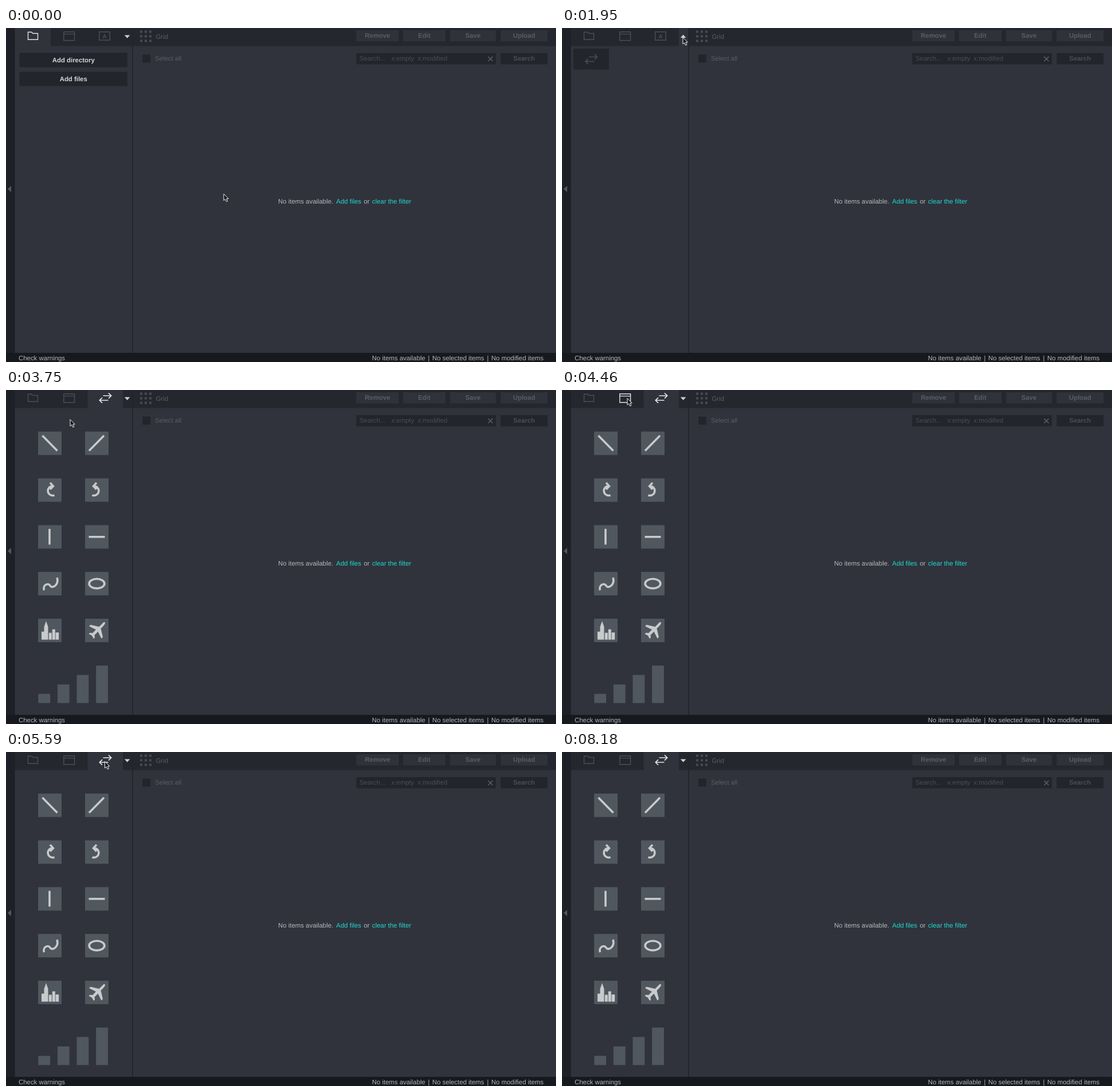
Write an HTML page that moves like this. It is 960x584 px and loops after 9010 ms.

```html
<!DOCTYPE html>
<html lang="en">
<head>
<meta charset="utf-8">
<title>Panel tabs</title>
<style>
  html, body { margin: 0; width: 100%; height: 100%; overflow: hidden; background: #30333b; }
  svg { display: block; width: 960px; height: 584px; }
  text {
    font: 11.4px "Liberation Sans", Arial, sans-serif; fill: #b4b7bc;
    white-space: pre; text-rendering: geometricPrecision;
  }
  .b { font-weight: bold; }
  .dim { fill: #595d65; }
  .faint { fill: #4a4e56; }
  .lit { fill: #d3d5d8; }
  .link { fill: #20d8d2; }
  .btn { fill: #22252b; }
  .raised { fill: #2f323a; }
  .field { fill: #2a2d34; }
  .tile { fill: #50575f; }
  .line { fill: none; stroke: #c8cacc; stroke-width: 3.6; }
  .solid { fill: #c8cacc; }
  .icon { fill: none; stroke: currentColor; stroke-width: 1.4; color: #4a4e57; }
  .icon text { fill: currentColor; stroke: none; font-size: 10px; font-weight: bold; }
  .icon.on { color: #e4e5e7; }
</style>
</head>
<body>
<svg id="stage" viewBox="0 0 960 584"></svg>
<script>
const LOOP = 9010;

const rect = (x, y, w, h, cls) => `<rect x="${x}" y="${y}" width="${w}" height="${h}" class="${cls}"/>`;
const box = (x, y, w, h, fill) => `<rect x="${x}" y="${y}" width="${w}" height="${h}" fill="${fill}"/>`;
const text = (x, y, s, cls = '', anchor = 'start') =>
  `<text x="${x}" y="${y}" class="${cls}" text-anchor="${anchor}">${s}</text>`;
const button = (x, y, w, h, s, cls, back = 'btn') =>
  rect(x, y, w, h, back) + text(x + w / 2, y + h / 2 + 3.7, s, 'b ' + cls, 'middle');
const group = (id, body, cls = '') => `<g id="${id}" class="${cls}">${body}</g>`;
const line = d => `<path class="line" d="${d}"/>`;
const solid = d => `<path class="solid" d="${d}"/>`;

const swap = '<path stroke-width="1.7" d="M-4-4H10M5.5-8.7l4.7 4.7-4.7 4.7M5 4H-10M-5.5-.7L-10.2 4l4.7 4.7"/>';
const at = (x, y, body) => `<g transform="translate(${x} ${y})">${body}</g>`;
const mirror = body => `<g transform="translate(41 0) scale(-1 1)">${body}</g>`;
const turn = line('M28.5 29.3A8.2 8.2 0 1 1 22 14.2H25M21 7.6l5.4 6-5.4 5.6');

const glyphs = [
  line('M7.5 7L33.5 33.5'),
  line('M33 7L7 33.5'),
  turn,
  mirror(turn),
  line('M20 6.5V34'),
  line('M6.5 20.5H34.5'),
  line('M10.5 32C7.5 24 17 17.5 21 24S37 22 33 10'),
  '<ellipse class="line" cx="20.5" cy="20.5" rx="13.4" ry="8.3"/>',
  solid('M6 36.5V22.5h4.5V14L14 4l3.5 10v22.5zM18.8 36.5v-12h5v12zM24.8 36.5v-18h5v18zM30.6 36.5V24h5.6v12.5z'),
  solid('M34.5 6c1.5 1.5-.5 4.5-3 7l-4 4 3.5 15-2.5 2.5-6-12-6 6 .5 4.5-2 2-3-5.5-5.5-3 2-2 4.5.5 6-6-12-6 2.5-2.5 15 3.5 4-4c2.5-2.5 4.5-5 6-4z')
];
const tiles = glyphs.map((g, i) =>
  at(56 + 82 * (i % 2), 72.7 + 81.8 * (i >> 1), rect(0, 0, 41, 41, 'tile') + g)).join('');
const bars = [16, 32.5, 49, 65.5].map((h, i) => rect(56.3 + 33.6 * i, 547.3 - h, 20.8, h, 'tile')).join('');

const dots = [...Array(9).keys()].map(i =>
  box(234 + 8 * (i % 3), 4.5 + 8 * (i / 3 | 0), 4, 4, '#474b54')).join('');

const field = (y, h, label) =>
  text(23.5, y - 7, label) + text(211.8, y - 7, '0', '', 'end') + rect(23.5, y, 188.5, h, 'field');

const chrome = [
  box(0, 0, 960, 584, '#30333b'),
  box(0, 0, 960, 31.5, '#24272d'),
  box(0, 0, 15.5, 568, '#1d2026'),
  box(220, 0, 1.8, 568, '#22252b'),
  box(0, 568, 960, 16, '#16191e'),
  '<path fill="#555962" d="M9 276v11l-6-5.5z"/>',
  dots,
  text(261.5, 19, 'Grid', 'dim'),
  button(611.5, 4, 74, 19.5, 'Remove', 'dim', 'raised'),
  button(693, 4, 74, 19.5, 'Edit', 'dim', 'raised'),
  button(775, 4, 80, 19.5, 'Save', 'dim', 'raised'),
  button(863.3, 4, 82, 19.5, 'Upload', 'dim', 'raised'),
  rect(238, 46.5, 14, 14, 'btn'),
  text(260, 57, 'Select all', 'dim'),
  rect(611.5, 44, 243.5, 19.5, 'btn'),
  text(617, 57, 'Search...', 'faint'),
  text(672.5, 57, 'x:empty', 'faint'),
  text(718.5, 57, 'x:modified', 'faint'),
  '<path stroke="#595d65" stroke-width="1.7" d="M841.5 50l8 8m0-8l-8 8"/>',
  button(863.3, 44, 82, 19.5, 'Search', 'faint'),
  text(475, 307, 'No items available.'),
  text(576.3, 307, 'Add files', 'link'),
  text(624.5, 307, 'or'),
  text(639, 307, 'clear the filter', 'link'),
  text(22, 581.3, 'Check warnings'),
  text(638.8, 581.3, 'No items available'),
  text(736.4, 580.5, '|'),
  text(744, 581.3, 'No selected items'),
  text(839.4, 580.5, '|'),
  text(847, 581.3, 'No modified items')
].join('');

const files = button(23.5, 43.5, 188.5, 25, 'Add directory', 'lit') +
  button(23.5, 76.5, 188.5, 25, 'Add files', 'lit');
const menu = rect(20, 36, 62, 36.5, 'btn') + group('swapItem', at(51.2, 54.5, swap), 'icon');
const meta = button(23.5, 43.5, 188.5, 25, 'Apply', 'faint') +
  field(101, 20.5, 'Title:') + field(149, 58, 'Description:') + field(234, 311, 'Keywords:') +
  text(145, 556.7, 'Copy') + text(176.6, 556, '|') + text(211.8, 556.7, 'Clear', '', 'end');

const tabs = [
  group('folder', '<path d="M38.5 7.2h6.2l2.2 2.3h8.6v10.8h-17z"/>', 'icon'),
  group('window', '<path d="M100.8 6.7h18.8v15h-18.8zM100.8 10.6h18.8"/>', 'icon'),
  group('letter', '<path d="M162.7 6.7h18.6v14.6h-18.6z"/>' + text(172, 17.6, 'A', '', 'middle'), 'icon'),
  group('swapTab', at(173.5, 14, swap), 'icon'),
  '<path id="toggle" fill="#d0d2d5"/>'
].join('');

const stage = document.getElementById('stage');
stage.innerHTML = chrome + '<rect id="active" height="32" fill="#30333b"/>' + tabs +
  group('files', files) + group('menu', menu) + group('transform', tiles + bars) + group('meta', meta) +
  '<path id="cursor" fill="#16181c" stroke="#f2f2f2" d="M0 0V11.6L2.7 9.2 4.7 13.6 6.8 12.7 4.9 8.4H8.3Z"/>';

const el = id => document.getElementById(id);
const show = (id, on) => el(id).setAttribute('visibility', on ? 'visible' : 'hidden');
const light = (id, on) => el(id).classList.toggle('on', on);

// start, panel, left edge and width of the open tab
const views = [
  [0, 'files', 15.5, 62.5],
  [1950, 'menu', 204, 16],
  [2920, 'transform', 142.5, 61.5],
  [4730, 'meta', 78.5, 62.5],
  [5590, 'transform', 142.5, 61.5]
];

// first step, last step, step count, points passed, easing
const out = u => 1 - (1 - u) ** 1.75;
const smooth = u => u * u * (3 - 2 * u);
const linear = u => u;
const moves = [
  [0, 0, 1, [[380, 290], [380, 290]], linear],
  [450, 450, 1, [[380, 290], [380, 286]], linear],
  [620, 1480, 10, [[380, 286], [211.5, 20.5]], out],
  [1570, 1570, 1, [[211.5, 20.5], [211, 16.5]], linear],
  [2130, 2560, 6, [[211, 16.5], [64.5, 45.5]], out],
  [3460, 4280, 10, [[64.5, 45.5], [82, 50], [112, 51.5], [160, 46], [181, 31], [123, 15.5]], linear],
  [4370, 4460, 2, [[123, 15.5], [114, 14.5]], linear],
  [4830, 5230, 5, [[114, 14.5], [172.5, 16.5]], out],
  [5770, 6060, 4, [[172.5, 16.5], [198.5, 74.5]], smooth],
  [7410, 8180, 9, [[198.5, 74.5], [970, 640]], u => u ** 1.15]
];

const latest = (rows, t) => rows.filter(r => r[0] <= t).pop();

function cursorAt(time) {
  const t = Math.max(0, time);
  const [start, end, n, pts, ease] = latest(moves, t);
  const step = (end - start) / (n - 1) || 1;
  const k = Math.min(n, Math.floor((t - start) / step + 0.01) + 1);
  const p = ease(k / n) * (pts.length - 1);
  const i = Math.min(Math.floor(p), pts.length - 2);
  return [0, 1].map(c => pts[i][c] + (pts[i + 1][c] - pts[i][c]) * (p - i));
}

function draw(t) {
  const [, view, left, width] = latest(views, t);
  for (const id of ['files', 'menu', 'transform', 'meta']) show(id, id === view);
  el('active').setAttribute('x', left);
  el('active').setAttribute('width', width);
  el('toggle').setAttribute('d', view === 'menu' ? 'M206.8 17h9.6l-4.8-5.2z' : 'M206.8 12.5h9.6l-4.8 5.2z');

  // hover lags the pointer by one step
  const [hx, hy] = cursorAt(t - 90);
  const over = (x0, x1, y0 = 0, y1 = 31) => hx >= x0 && hx < x1 && hy >= y0 && hy < y1;
  const swapped = t >= 2920;
  show('letter', !swapped);
  show('swapTab', swapped);
  light('folder', view === 'files' || over(16, 78));
  light('window', view === 'meta' || over(78, 141));
  light('letter', over(142, 204));
  light('swapTab', view === 'transform' || over(142, 204));
  light('swapItem', over(20, 82, 36, 73));

  const [x, y] = cursorAt(t);
  el('cursor').setAttribute('transform', `translate(${x.toFixed(1)} ${y.toFixed(1)})`);
}

const begin = performance.now();
function tick() {
  draw(Math.max(0, performance.now() - begin) % LOOP);
  requestAnimationFrame(tick);
}
tick();
</script>
</body>
</html>
```
